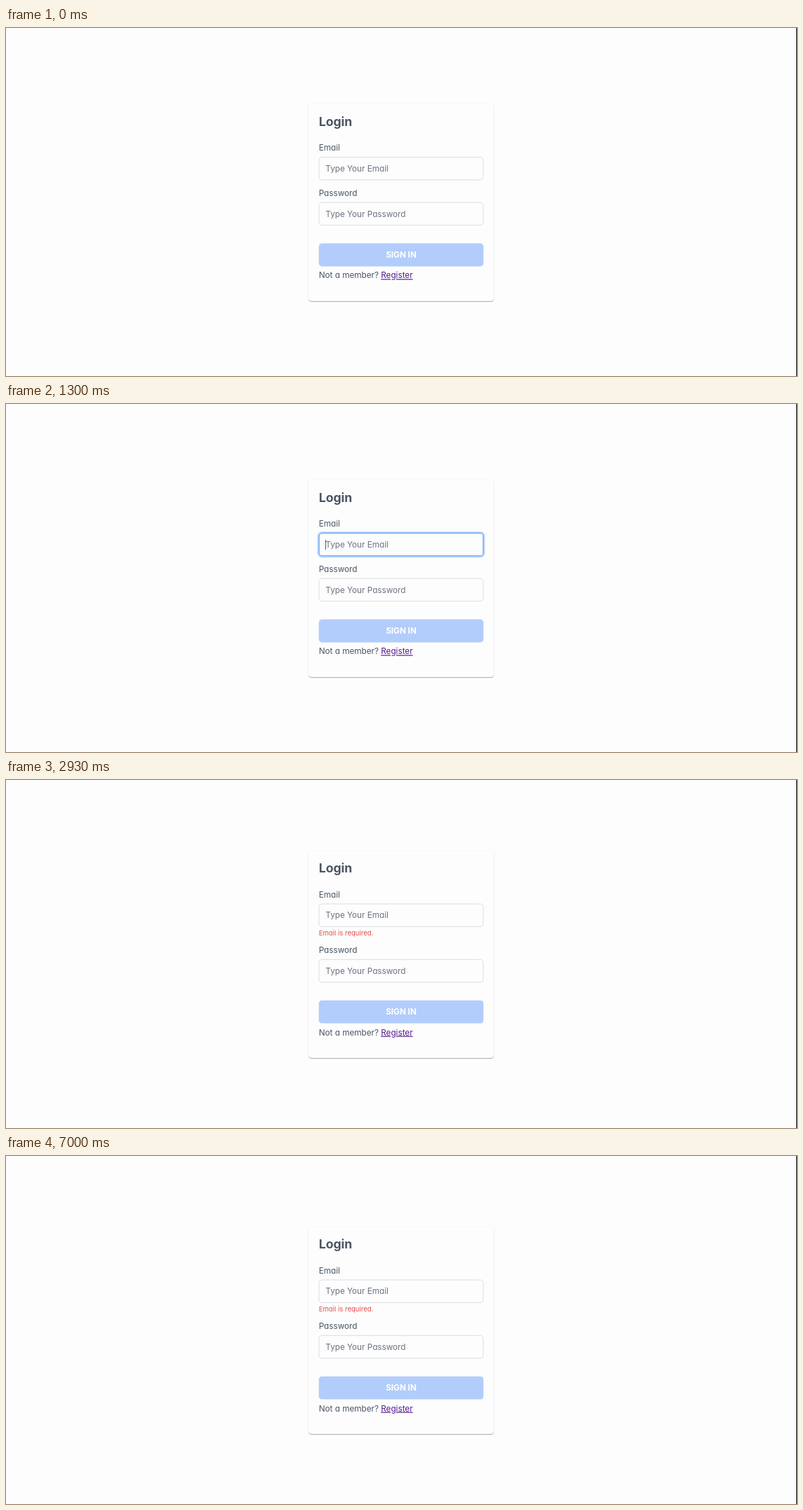
An HTML page that plays this animation: 1127 px wide and 497 px high, repeating every 8 s.

```html
<!DOCTYPE html>
<html lang="en">
<head>
<meta charset="utf-8">
<title>Login</title>
<style>
  html, body { margin: 0; width: 100%; height: 100%; overflow: hidden; background: #fdfdfd; }
  .stage { position: relative; width: 1127px; height: 497px; overflow: hidden; }
  .edge { position: absolute; left: 1126px; top: 0; width: 1px; height: 497px; background: #000; }
  .card {
    position: absolute; left: 431px; top: 108px; width: 264px; height: 281.6px;
    border-radius: 4.4px; background: #fdfdfd;
    box-shadow: 0 1.5px .7px -.7px rgba(0,0,0,.2), 0 .7px .7px rgba(0,0,0,.14), 0 .7px 2.2px rgba(0,0,0,.12);
    animation: grow 8s step-end infinite;
  }
  svg { position: absolute; left: 0; top: 0; }
  text {
    font: 11.73px Inter, sans-serif;
    font-feature-settings: "cv02", "cv03", "cv04", "cv11";
    fill: #4b5563;
  }
  .title { font-size: 17.6px; font-weight: 700; }
  .hint { fill: #6b7280; }
  .error { font-size: 9.55px; fill: #e24c4c; animation: error 8s step-end infinite; }
  .action { font-weight: 700; fill: #fff; text-anchor: middle; }
  .link { fill: #551a8b; text-decoration: underline; }
  .field { fill: #fdfdfd; stroke: #d1d5db; stroke-width: .8; }
  .glow { fill: none; stroke: #bfdbfe; stroke-width: 3; }
  .outline { fill: none; stroke: #3b82f6; stroke-width: .8; }

  .upper { animation: up 8s step-end infinite; }
  .lower { animation: down 8s step-end infinite; }
  .focus { animation: focus 8s linear infinite; }
  .caret { fill: #333; animation: caret 8s step-end infinite; }
  .cursor { animation: move 8s linear infinite, show 8s step-end infinite; }

  /* the error message makes the centred card taller */
  @keyframes grow {
    0% { top: 108px; height: 281.6px; }
    21.6%, 100% { top: 100.5px; height: 296.4px; }
  }
  @keyframes up { 0% { transform: none; } 21.6%, 100% { transform: translateY(-7.5px); } }
  @keyframes down { 0% { transform: none; } 21.6%, 100% { transform: translateY(7.2px); } }
  @keyframes error { 0% { opacity: 0; } 21.6%, 100% { opacity: 1; } }

  @keyframes focus {
    0%, 4% { opacity: 0; }
    5.4%, 21.9% { opacity: 1; }
    24.1%, 100% { opacity: 0; }
  }
  @keyframes caret {
    0% { opacity: 0; }
    4.1% { opacity: 1; }
    10% { opacity: 0; }
    16.2% { opacity: 1; }
    21.6%, 100% { opacity: 0; }
  }
  @keyframes move {
    0%, 9.5% { transform: translate(838px, 497px); }
    10.3% { transform: translate(842px, 385px); }
    11.25% { transform: translate(852px, 289px); }
    12.2% { transform: translate(888px, 290px); }
    13.2% { transform: translate(918px, 318px); }
    14% { transform: translate(920px, 346px); }
    15% { transform: translate(893px, 404px); }
    16.2%, 100% { transform: translate(862px, 497px); }
  }
  @keyframes show {
    0% { opacity: 0; }
    9.6% { opacity: 1; }
    16.2%, 100% { opacity: 0; }
  }
</style>
</head>
<body>
<div class="stage">
  <div class="card"></div>
  <svg width="1127" height="497" viewBox="0 0 1127 497">
    <g class="upper">
      <text class="title" x="445.7" y="139.5">Login</text>
      <text x="445.7" y="175.3">Email</text>
      <rect class="field" x="446" y="184.5" width="234" height="32.4" rx="4.2"/>
      <g class="focus">
        <rect class="glow" x="445" y="183.5" width="236" height="34.4" rx="5"/>
        <rect class="outline" x="446" y="184.5" width="234" height="32.4" rx="4.2"/>
      </g>
      <text class="hint" x="455.3" y="204.9">Type Your Email</text>
      <rect class="caret" x="455" y="194" width=".8" height="14"/>
    </g>
    <text class="error" x="445.7" y="221.7">Email is required.</text>
    <g class="lower">
      <text x="445.7" y="240.3">Password</text>
      <rect class="field" x="446" y="249.2" width="234" height="32.4" rx="4.2"/>
      <text class="hint" x="455.3" y="269.6">Type Your Password</text>
      <rect x="445.7" y="307.6" width="234.6" height="32.8" rx="4.4" fill="#b2cdfb"/>
      <text class="action" x="563" y="328.3">SIGN IN</text>
      <text x="445.7" y="357.4">Not a member? <tspan class="link">Register</tspan></text>
    </g>
    <path class="cursor" d="M0 0V12L2.8 9.4 4.6 13.5 6.4 12.7 4.6 8.8H8.4Z"
          fill="#fff" stroke="#333" stroke-width=".9" stroke-linejoin="round"/>
  </svg>
  <div class="edge"></div>
</div>
</body>
</html>
```
